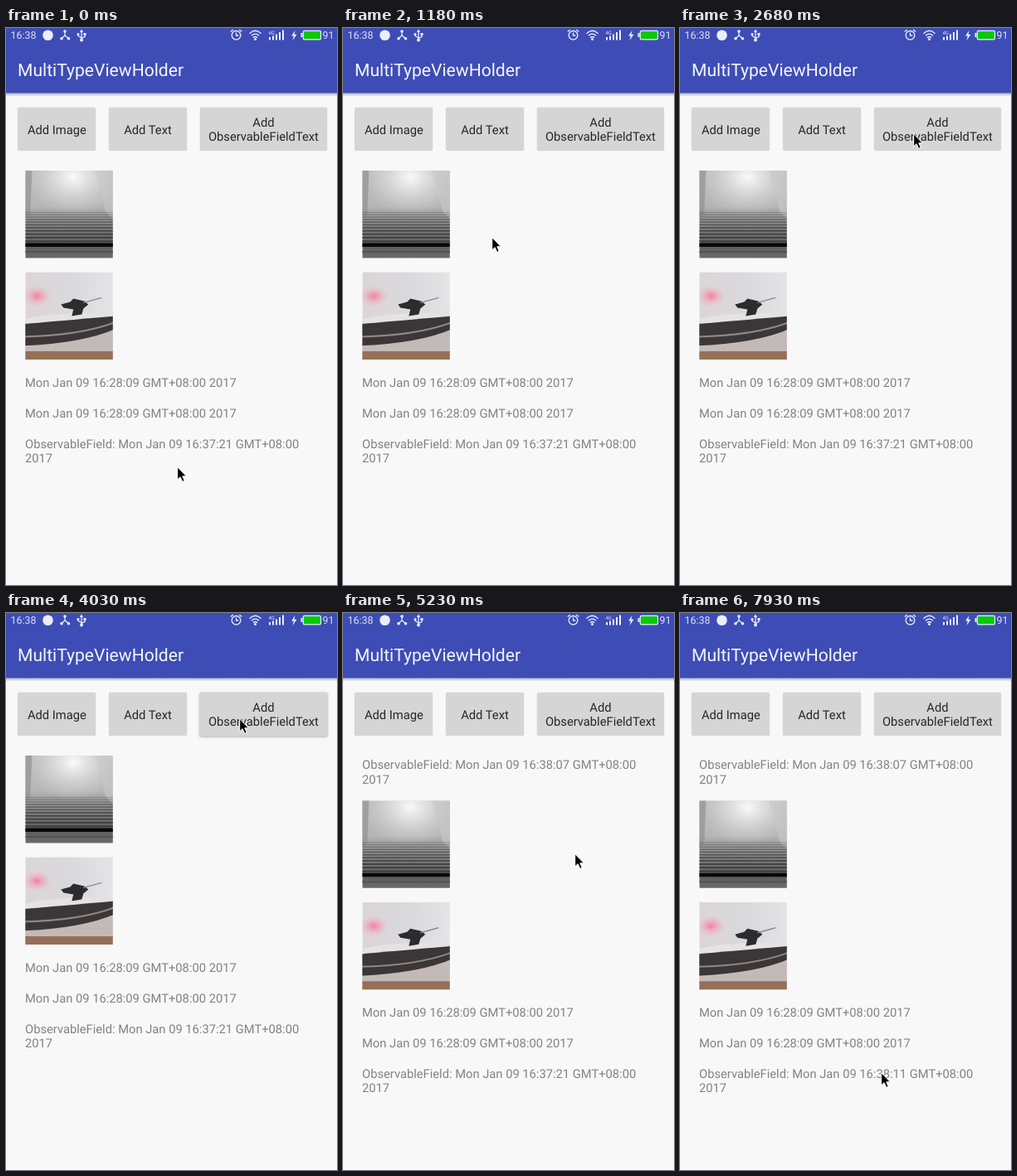
These frames come from a looping animation (399x672 px, 8000 ms). An HTML page:

```html
<!DOCTYPE html>
<html lang="en">
<head>
<meta charset="utf-8">
<title>MultiTypeViewHolder</title>
<style>
  html, body { margin: 0; height: 100%; overflow: hidden; background: #f8f8f8; }
  svg { display: block; width: 100%; height: 100%; }
  text { font: 14.72px Roboto, sans-serif; white-space: pre; text-rendering: geometricPrecision; }
  .status { font-size: 12.4px; fill: #dfe2f4; }
  .title { font-size: 21.1px; fill: #f4f5fc; }
  .label { fill: #262626; text-anchor: middle; }
  .item { fill: #828282; }
  .line { fill: none; stroke: #eceefa; stroke-width: 1.3; }
  .solid { fill: #eceefa; }
</style>
</head>
<body>
<svg viewBox="0 0 399 672">
  <defs>
    <linearGradient id="barShade" x2="0" y2="1">
      <stop stop-color="#b4b4bd"/><stop offset="1" stop-color="#f8f8f8"/>
    </linearGradient>
    <linearGradient id="fog" x2="0" y2="1">
      <stop stop-color="#bcbcbc"/><stop offset=".4" stop-color="#b6b6b6"/>
      <stop offset=".56" stop-color="#919191"/><stop offset=".84" stop-color="#5c5c5c"/>
      <stop offset="1" stop-color="#6a6a6a"/>
    </linearGradient>
    <radialGradient id="glow">
      <stop stop-color="#fafafa"/><stop offset="1" stop-color="#dcdcdc" stop-opacity="0"/>
    </radialGradient>
    <radialGradient id="pink">
      <stop stop-color="#f27f9f"/><stop offset="1" stop-color="#f0b8c6" stop-opacity="0"/>
    </radialGradient>
    <linearGradient id="wall">
      <stop stop-color="#dcd5d8"/><stop offset=".55" stop-color="#dad9dc"/><stop offset="1" stop-color="#e4e4e6"/>
    </linearGradient>
    <clipPath id="square"><path d="M0 0H105.5V105.5H0Z"/></clipPath>
    <clipPath id="wideButton"><rect x="233.700" y="95.700" width="153.500" height="52.600" rx="2"/></clipPath>
    <filter id="soft"><feGaussianBlur stdDeviation="1.3"/></filter>
    <filter id="photo"><feGaussianBlur stdDeviation=".7"/></filter>
  </defs>

  <rect width="399" height="672" fill="#f8f8f8"/>
  <rect y="78.600" width="399" height="4" fill="url(#barShade)"/>
  <rect width="399" height="78.600" fill="#3d4db5"/>

  <!-- status bar -->
  <text class="status" x="5.500" y="13.300">16:38</text>
  <text class="status" x="381.500" y="13.300">91</text>
  <circle class="solid" cx="50.500" cy="8.700" r="6.300"/>
  <path class="line" d="M71 4V9L66.500 13M71 9L76 13"/>
  <g class="solid">
    <circle cx="71" cy="4" r="1.800"/><circle cx="67" cy="12.800" r="1.800"/><circle cx="75.500" cy="12.800" r="1.800"/>
    <circle cx="91" cy="14.500" r="1.900"/><path d="M91 1.500l2.200 3.500h-4.400ZM93.500 6h3v3h-3Z"/>
    <circle cx="87" cy="7.500" r="1.500"/>
    <path d="M348.500 3L344 9.500h2.800L345.500 15L350.500 7.800h-3Z"/>
    <rect x="355.500" y="6" width="2" height="5"/>
    <path d="M317 11h2v3.500h-2ZM321 9.500h2v5h-2ZM325 7.500h2v7h-2ZM329 5h2v9.500h-2ZM333 2.500h2v12h-2Z"/>
    <circle cx="300.500" cy="13.500" r="1.500"/>
  </g>
  <path class="line" d="M87 8V9.500L91 12M95 9V10.500L91 12.500M91 4V14"/>
  <circle class="line" cx="277.500" cy="8.800" r="5.300"/>
  <path class="line" d="M277.500 5.500V9h2.800M270.800 4.500l3-2.500M284.200 4.500l-3-2.500M293.500 6.800q7-7 14 0M296 9.300q4.500-4.500 9 0M298 11.800q2.500-2.500 5 0"/>
  <text class="status" x="316.500" y="7.500" style="font-size:6px">4G</text>
  <rect x="358.300" y="3.300" width="21.200" height="10.600" rx="1.500" fill="#0bc80b" stroke="#eceefa" stroke-width="1.200"/>
  <text class="title" x="14" y="58">MultiTypeViewHolder</text>

  <!-- buttons -->
  <rect id="lift" x="233" y="96" width="155" height="54" rx="3" fill="#bdbdbd" filter="url(#soft)"/>
  <g fill="#d5d5d5">
    <rect x="13.800" y="95.700" width="94.400" height="52.600" rx="2"/>
    <rect x="123.800" y="95.700" width="94.400" height="52.600" rx="2"/>
    <rect x="233.700" y="95.700" width="153.500" height="52.600" rx="2"/>
  </g>
  <circle id="ripple" cx="310" cy="124" fill="#c9c9c9" clip-path="url(#wideButton)"/>
  <text class="label" x="61.300" y="127.600">Add Image</text>
  <text class="label" x="171" y="127.600">Add Text</text>
  <text class="label" x="310.400" y="119">Add</text>
  <text class="label" x="310.400" y="136.300">ObservableFieldText</text>

  <!-- list -->
  <g id="added" class="item">
    <text x="23" y="188.300">ObservableField: Mon Jan 09 16:38:07 GMT+08:00</text>
    <text x="23" y="205.600">2017</text>
  </g>
  <g id="list" class="item">
    <g transform="translate(23.300 172)" clip-path="url(#square)">
      <rect width="106" height="106" fill="url(#fog)"/>
      <ellipse cx="58" cy="8" rx="58" ry="46" fill="url(#glow)"/>
      <g filter="url(#photo)">
        <path d="M84 0H110V62L97 50Z" fill="#c9c9c9" opacity=".6"/>
        <path d="M-4 0H8L6 52L-4 60Z" fill="#8c8c8c" opacity=".6"/>
        <g id="steps"></g>
        <path d="M-4 87.500H110V92H-4Z" fill="#080808"/>
        <path d="M-4 97H110V99H-4Z" fill="#525252"/>
      </g>
    </g>
    <g transform="translate(23.300 294.400)" clip-path="url(#square)">
      <rect width="106" height="106" fill="url(#wall)"/>
      <ellipse cx="14" cy="29" rx="18" ry="13" fill="url(#pink)"/>
      <g filter="url(#photo)">
        <path d="M-4 66H110V110H-4Z" fill="#c3bab7"/>
        <path d="M-4 58Q30 47 110 50V64H-4Z" fill="#e6e2e2"/>
        <path d="M-4 63Q40 59 110 53V68Q70 86 -4 89Z" fill="#3b3637"/>
        <path d="M-4 78Q66 77 110 60" fill="none" stroke="#8f8785" stroke-width="2"/>
        <path d="M43 39L54 36L58 32L71 35L76 39L70 44L68 51L56 53L58 45L46 43Z" fill="#2c2b2e"/>
        <path d="M70 37L92 31" stroke="#8d8b90" stroke-width="1.500"/>
        <path d="M-4 95.500H110V110H-4Z" fill="#966f58"/>
      </g>
    </g>
    <text x="23" y="432.800">Mon Jan 09 16:28:09 GMT+08:00 2017</text>
    <text x="23" y="469.700">Mon Jan 09 16:28:09 GMT+08:00 2017</text>
    <text id="stamp" x="23" y="506.700"></text>
    <text x="23" y="524">2017</text>
  </g>

  <path id="cursor" d="M.7 .8V15.800L4.100 12.700L6.700 18.400L9.200 17.300L6.800 11.800H11.400Z" fill="#000" stroke="#fff" stroke-width="1"/>
</svg>
<script>
const $ = id => document.getElementById(id);
const LOOP = 8000, STEP = 150;

// Cursor path: tick, x, y
const path = [
  [0, 206, 529], [4, 190, 400], [6, 160, 310], [8, 179, 252],
  [11, 149, 205], [13, 193, 160], [14, 278, 157], [15, 279, 129], [18, 281, 127],
  [31, 281, 127], [34, 303, 252], [36, 255, 328], [38, 261, 336],
  [39, 261, 336], [41, 225, 520], [42, 234, 575], [46, 242, 554]
];

let rows = "";
for (let y = 50, gap = 2.6; y < 86; y += gap, gap *= 1.06)
  rows += `<rect x="-4" y="${y}" width="114" height="${gap * 0.45}" fill="#383838" opacity="${Math.min(.85, (y - 40) / 40)}"/>`;
$("steps").innerHTML = rows;

// The screen is sampled every 150 ms, with one shorter gap before 1180 ms
const tickAt = t => t < 1180 ? Math.floor(t / STEP) : 8 + Math.floor((t - 1180) / STEP);

function cursorAt(tick) {
  const i = path.findIndex(p => p[0] > tick);
  if (i < 0) return path[path.length - 1].slice(1);
  const [a, x, y] = path[i - 1], [b, nextX, nextY] = path[i];
  const k = (tick - a) / (b - a);
  return [x + (nextX - x) * k, y + (nextY - y) * k];
}

const show = (id, on) => $(id).setAttribute("visibility", on ? "visible" : "hidden");

function draw(now) {
  const tick = tickAt(now % LOOP), isAdded = tick >= 28;
  show("lift", tick === 27);
  show("ripple", tick === 28 || tick === 29);
  $("ripple").setAttribute("r", tick === 28 ? 64 : 90);
  $("ripple").setAttribute("opacity", tick === 28 ? 1 : .5);
  show("added", isAdded);
  $("list").setAttribute("transform", `translate(0 ${isAdded ? 54.3 : 0})`);
  $("stamp").textContent = `ObservableField: Mon Jan 09 16:${tick < 53 ? "37:21" : "38:11"} GMT+08:00`;
  $("cursor").setAttribute("transform", `translate(${cursorAt(tick)})`);
}

const start = performance.now();
function frame() {
  draw(performance.now() - start);
  requestAnimationFrame(frame);
}
frame();
</script>
</body>
</html>
```
